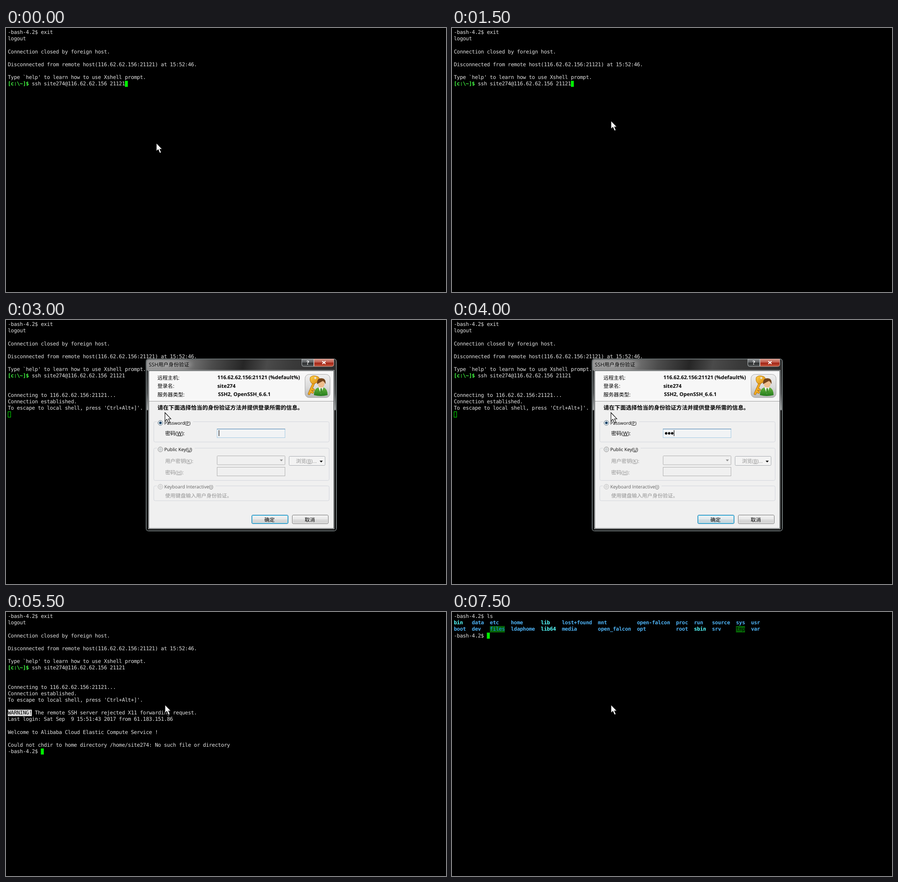
An HTML page for the animation above (8 s loop, 966x580 px).

```html
<!DOCTYPE html>
<html lang="zh">
<head>
<meta charset="utf-8">
<title>SSH login</title>
<style>
  html, body { margin: 0; width: 100%; height: 100%; overflow: hidden; background: #000; }
  svg { display: block; width: 966px; height: 580px; }
  text { white-space: pre; text-rendering: geometricPrecision; }
  #term text { font: 11.5px "DejaVu Sans Mono", monospace; fill: #e2e2e2; }
  #term .prompt { fill: #44ff44; font-weight: bold; }
  #term .dir { fill: #4db0f2; font-weight: bold; }
  #term .link { fill: #55ffff; font-weight: bold; }
  #term .open { fill: #1e90ff; }
  #term .dark { fill: #000; }
  #dialog text { font-family: "Open Sans", "Noto Sans CJK SC", "Noto Sans CJK", sans-serif; }
</style>
</head>
<body>
<svg viewBox="0 0 966 580" xmlns="http://www.w3.org/2000/svg">
  <defs>
    <linearGradient id="frame" x2="0" y2="1">
      <stop offset="0" stop-color="#5c5f61"/><stop offset=".07" stop-color="#2b2d2e"/>
      <stop offset=".2" stop-color="#4a4c4d"/><stop offset=".295" stop-color="#a4a6a7"/>
      <stop offset=".3" stop-color="#0b0b0b"/><stop offset="1" stop-color="#060606"/>
    </linearGradient>
    <linearGradient id="sheen" gradientUnits="userSpaceOnUse" x1="308" y1="86" x2="725" y2="160">
      <stop offset="0" stop-color="#929292"/><stop offset=".2" stop-color="#7c7c7c"/>
      <stop offset=".34" stop-color="#4c4c4c"/><stop offset=".5" stop-color="#262626"/>
      <stop offset=".62" stop-color="#4a4a4a"/><stop offset=".75" stop-color="#3a3a3a"/>
      <stop offset="1" stop-color="#2c2c2c"/>
    </linearGradient>
    <linearGradient id="help" x2="0" y2="1">
      <stop offset="0" stop-color="#8f9294"/><stop offset=".48" stop-color="#5b5e60"/>
      <stop offset=".5" stop-color="#2a2c2d"/><stop offset="1" stop-color="#505354"/>
    </linearGradient>
    <linearGradient id="close" x2="0" y2="1">
      <stop offset="0" stop-color="#d99a8c"/><stop offset=".48" stop-color="#c0584a"/>
      <stop offset=".5" stop-color="#a01f12"/><stop offset="1" stop-color="#c4553a"/>
    </linearGradient>
    <linearGradient id="button" x2="0" y2="1">
      <stop offset="0" stop-color="#f3f3f3"/><stop offset=".5" stop-color="#e8e8e8"/>
      <stop offset=".5" stop-color="#dcdcdc"/><stop offset="1" stop-color="#cfcfcf"/>
    </linearGradient>
    <linearGradient id="hot" x2="0" y2="1">
      <stop offset="0" stop-color="#e8f4fa"/><stop offset=".5" stop-color="#d6edf7"/>
      <stop offset=".5" stop-color="#bfe2f2"/><stop offset="1" stop-color="#b0d9ec"/>
    </linearGradient>
    <linearGradient id="tile" x2="0" y2="1">
      <stop offset="0" stop-color="#f0f0f0"/><stop offset=".55" stop-color="#dadada"/><stop offset="1" stop-color="#b8b8b8"/>
    </linearGradient>
    <linearGradient id="gold" x2="1" y2="1">
      <stop offset="0" stop-color="#ffd34a"/><stop offset="1" stop-color="#d8850c"/>
    </linearGradient>
    <linearGradient id="coat" x2="0" y2="1">
      <stop offset="0" stop-color="#63b53a"/><stop offset="1" stop-color="#257b1e"/>
    </linearGradient>
    <filter id="blur" x="-30%" y="-100%" width="160%" height="300%"><feGaussianBlur stdDeviation="5"/></filter>
  </defs>
  <rect width="966" height="580"/>
  <g id="term"></g>
  <g id="dialog"></g>
  <path id="pointer" d="M0 .5V19L4.2 15.2 7.6 23 11 21.6 7.8 14.2H13Z" fill="#f8f8f8" stroke="#000" stroke-width="1.1"/>
</svg>
<script>
const STEP = 500, LOOP = 8000;
const LEFT = 4, CELL = 6.59, TOP = 2.5, LINE = 14.14;
const USER = 'site274', HOST = '116.62.62.156';
const GREEN = '#00f000', LIGHT = '#e0e0e0';
const $ = id => document.getElementById(id);
const colX = c => LEFT + c * CELL;
const rowY = r => TOP + r * LINE;

/* ---- terminal ---- */
function print(row, text, cls = '', col = 0) {
  const xs = [...text].map((_, i) => colX(col + i).toFixed(2)).join(' ');
  return `<text class="${cls}" x="${xs}" y="${(rowY(row) + 10.6).toFixed(2)}">${text}</text>`;
}
const fill = (row, col, cols, color) =>
  `<rect x="${colX(col)}" y="${rowY(row)}" width="${cols * CELL}" height="${LINE}" fill="${color}"/>`;
const cursor = (row, col) =>
  `<rect x="${colX(col)}" y="${rowY(row) + .4}" width="6.5" height="13.3" fill="${GREEN}"/>`;
const hollow = row =>
  `<rect x="${LEFT + .5}" y="${rowY(row) + .9}" width="5.7" height="12.2" fill="none" stroke="${GREEN}"/>`;

const PS1 = '-bash-4.2$ ';
const COMMAND = `ssh ${USER}@${HOST} 21121`;
const END = 8 + COMMAND.length;

const history = print(0, PS1 + 'exit') + print(1, 'logout') +
  print(3, 'Connection closed by foreign host.') +
  print(5, `Disconnected from remote host(${HOST}:21121) at 15:52:46.`) +
  print(7, "Type `help' to learn how to use Xshell prompt.") +
  print(8, '[c:\\~]$', 'prompt') + print(8, COMMAND, '', 8);

function selection() {
  const from = 27, x = colX(from);
  return `<rect x="${x}" y="${rowY(8)}" width="${966 - x}" height="${LINE}" fill="${LIGHT}"/>` +
    `<rect x="${LEFT}" y="${rowY(9)}" width="962" height="${LINE}" fill="${LIGHT}"/>` +
    print(8, COMMAND.slice(from - 8), 'dark', from);
}

const connecting = print(11, `Connecting to ${HOST}:21121...`) +
  print(12, 'Connection established.') +
  print(13, "To escape to local shell, press 'Ctrl+Alt+]'.");

const welcome = fill(15, 0, 8, LIGHT) + print(15, 'WARNING!', 'dark') +
  print(15, 'The remote SSH server rejected X11 forwarding request.', '', 9) +
  print(16, 'Last login: Sat Sep  9 15:51:43 2017 from 61.183.151.86') +
  print(18, 'Welcome to Alibaba Cloud Elastic Compute Service !') +
  print(20, `Could not chdir to home directory /home/${USER}: No such file or directory`) +
  print(21, PS1);

function listing() {
  const cols = [0, 6, 12, 19, 29, 36, 48, 61, 74, 80, 86, 94, 99];
  const rows = [
    'bin data etc home lib lost+found mnt open-falcon proc run source sys usr',
    'boot dev files ldaphome lib64 media open_falcon opt root sbin srv tmp var'
  ];
  const kinds = { bin: 'link', lib: 'link', lib64: 'link', sbin: 'link', files: 'open', tmp: 'dark' };
  return rows.map((line, r) => line.split(' ').map((name, i) => {
    const kind = kinds[name] || 'dir';
    const back = kind === 'open' || kind === 'dark' ? fill(r + 1, cols[i], name.length, '#066406') : '';
    return back + print(r + 1, name, kind, cols[i]);
  }).join('')).join('');
}

function screen(k) {
  if (k < 4) return history + (k === 2 ? selection() : '') + cursor(8, END);
  if (k < 11) return history + connecting + (k < 6 ? cursor(14, 0) : hollow(14));
  if (k < 13) {
    const body = history + connecting + welcome;
    return k === 11 ? body + cursor(21, 11) : body + print(22, PS1) + print(23, PS1) + cursor(23, 11);
  }
  if (k === 13) return print(0, PS1) + cursor(0, 11);
  if (k === 14) return print(0, PS1 + 'l') + cursor(0, 12);
  return print(0, PS1 + 'ls') + listing() + print(3, PS1) + cursor(3, 11);
}

/* ---- dialog ---- */
// "~" underlines the next letter; Latin runs may have their own size.
function label(x, y, text, { color = '#000', size = 11.3, latin = size, weight = 400, anchor = 'start' } = {}) {
  const runs = text.match(/~.|[\u3000-\u9fff]+|[^~\u3000-\u9fff]+/g).map(run => {
    if (run[0] === '~') return `<tspan font-size="${latin}" text-decoration="underline">${run[1]}</tspan>`;
    return `<tspan font-size="${/[\u3000-\u9fff]/.test(run) ? size : latin}">${run}</tspan>`;
  });
  return `<text x="${x}" y="${y}" fill="${color}" font-weight="${weight}" text-anchor="${anchor}">${runs.join('')}</text>`;
}
const box = (x, y, w, h, fill, stroke = 'none', r = 0, extra = '') =>
  `<rect x="${x}" y="${y}" width="${w}" height="${h}" rx="${r}" fill="${fill}" stroke="${stroke}" ${extra}/>`;
const group = (y, h, gap) => box(324.5, y, 385, h, 'none', '#d3d6dc', 3) + box(331, y - 2, gap, 4, '#f0f0f0');
const radio = (y, edge, inner, dot = '') =>
  `<circle cx="339" cy="${y}" r="5.3" fill="#f6f6f6" stroke="${edge}"/>` +
  `<circle cx="339" cy="${y}" r="3.7" fill="${inner}"/>` + dot;
const arrow = (x, y, color) => `<path d="M${x - 3.5} ${y - 1.5}h7l-3.5 4Z" fill="${color}"/>`;

function badge() {
  const key = 'M676 138L665.5 162M668 156l5 3M670 151l5 2.5';
  return box(656.5, 119.5, 55, 51, 'url(#tile)', '#a9a9a9', 9) +
    `<g fill="none" stroke-linecap="round">
       <path d="${key}" stroke="#a8680c" stroke-width="5.4"/><path d="${key}" stroke="#f3ad22" stroke-width="3.6"/>
     </g>
     <path d="M668 126q5-5 12-3q8 1 8 7q-1 6-7 8q-6 4-10 1q-5-5-3-13Z" fill="url(#gold)" stroke="#b8740c"/>
     <circle cx="679" cy="127.5" r="2.4" fill="#e6e0d0"/>
     <path d="M676 165q0-14 10-17h11q9 3 9 17q-15 4-30 0Z" fill="url(#coat)"/>
     <path d="M686 148h11l-5.5 15Z" fill="#f4f4f4"/><path d="M690.5 150h3l1 9-2.5 4-2.5-4Z" fill="#3c8f2a"/>
     <ellipse cx="692" cy="140" rx="7.5" ry="9" fill="#efbd8c"/>
     <path d="M683 141q-1-13 9-13q11 0 9.500 13q-3-6-6-7q-6 3-12.500 7Z" fill="#74451b"/>`;
}

const gray = { color: '#929292' };
const bold = { weight: 700 };
const radioText = { latin: 10.1 };
const centered = { anchor: 'middle' };

$('dialog').innerHTML =
  box(307.5, 85.5, 418, 378, 'url(#frame)', '#8f9a9c', 5) +
  box(308.5, 86.5, 416, 25, 'url(#sheen)', 'none', 4) +
  box(308.5, 86.5, 416, 376, 'none', '#45494a', 4) +
  `<ellipse cx="359" cy="98" rx="50" ry="8" fill="#c4c4c4" opacity=".45" filter="url(#blur)"/>` +
  label(313.5, 101.5, 'SSH用户身份验证') +
  `<path d="M649.5 85.5V98q0 4 4 4H675.5V85.5Z" fill="url(#help)" stroke="#b5babb"/>
   <path d="M676.5 85.5V102H715.5q4 0 4-4V85.5Z" fill="url(#close)" stroke="#c9a9a3"/>
   <path d="M694.5 90.5l7 6M701.5 90.5l-7 6" stroke="#fff" stroke-width="2.2"/>` +
  label(662.5, 98, '?', { color: '#fff', size: 12, weight: 700, anchor: 'middle' }) +
  box(312.5, 110.5, 408, 348.5, '#f0f0f0', '#b9bfc0') +
  box(313.5, 111.5, 406, 346.5, '#f0f0f0', '#3a3c3d') +
  box(314, 112, 405, 66.5, '#f7f7f7') + box(314, 178, 405, 1, '#a0a0a0') +
  label(332.5, 130.5, '远程主机:') + label(332.5, 149, '登录名:') + label(332.5, 167.5, '服务器类型:') +
  label(464, 130.2, `${HOST}:21121 (%default%)`, bold) +
  label(464, 148.8, USER, bold) +
  label(465.5, 167, 'SSH2, OpenSSH_6.6.1', bold) +
  badge() +
  label(332.5, 196.7, '请在下面选择恰当的身份验证方法并提供登录所需的信息。', { size: 12.3, weight: 700 }) +
  group(223.5, 44.5, 80) +
  radio(226, '#5f6f7d', '#d5e6f0', '<circle cx="339" cy="226" r="2.8" fill="#123f63"/>') +
  label(347.5, 229.8, 'Password(~P)', radioText) +
  label(349.5, 252.8, '密码(~W):') +
  box(463.5, 239.5, 149, 19, '#f1f3f5', '#a4cbe4') + box(463, 239, 150, 1, '#3d7bad') +
  group(281.5, 71, 83) + radio(284.3, '#8a8a8a', '#d3d6d8') +
  label(347.5, 288.2, 'Public Key(~U)', radioText) +
  label(349.5, 314, '用户密钥(~K):', gray) + label(349.5, 338.5, '密码(~H):', gray) +
  box(463.5, 298.5, 149, 19.5, '#f0f0f0', '#b0b0b0', 1) + arrow(604.5, 308, '#8c8c8c') +
  box(463.5, 323.5, 149, 19, '#f0f0f0', '#b0b0b0') +
  box(621.5, 299.5, 79, 20, '#f3f3f3', '#a9adb2', 2) + label(636.5, 314, '浏览(~B)...', gray) + arrow(692, 310.5, '#111') +
  group(364.5, 32.5, 129) + radio(366.3, '#b5b5b5', '#dedede') +
  label(347.5, 370.2, 'Keyboard Interactive(~I)', { latin: 10.25, color: '#626262' }) +
  label(349.5, 389.5, '使用键盘输入用户身份验证。', gray) +
  box(539.5, 428.5, 80, 19, 'url(#button)', '#2f7fae', 2.5) +
  box(540.5, 429.5, 78, 17, 'url(#hot)', 'none', 1, 'id="glow"') +
  box(540.5, 429.5, 78, 17, 'none', '#45c8ee', 1.5) +
  label(578.5, 443, '确定', centered) +
  box(628.5, 428.5, 79, 19, 'url(#button)', '#747474', 2.5) +
  box(629.5, 429.5, 77, 17, 'none', '#f4f4f4', 1.5) +
  label(667, 443, '取消', centered) +
  '<g id="secret"></g>';

function secret(n) {
  const pitch = 6.65;
  const dots = Array.from({ length: n }, (_, i) => `<circle cx="${470.2 + i * pitch}" cy="249" r="2.7"/>`);
  return dots.join('') + box(467 + n * pitch, 242, 1.1, 13, '#000');
}

/* ---- timeline ---- */
const typed = [0, 1, 3, 5, 6];
const path = [[330, 252], [314, 136], [337, 197], [349, 203]];

function draw(k) {
  $('term').innerHTML = screen(k);
  const open = k >= 6 && k <= 10;
  $('dialog').style.display = open ? '' : 'none';
  if (open) {
    $('secret').innerHTML = secret(typed[k - 6]);
    $('glow').setAttribute('opacity', Math.max(0, (k - 7) / 3));
  }
  $('pointer').setAttribute('transform', `translate(${path[Math.min(k, 3)]})`);
}

let shown = -1;
function tick() {
  const k = Math.floor(performance.now() % LOOP / STEP);
  if (k !== shown) draw(shown = k);
  requestAnimationFrame(tick);
}
tick();
</script>
</body>
</html>
```
